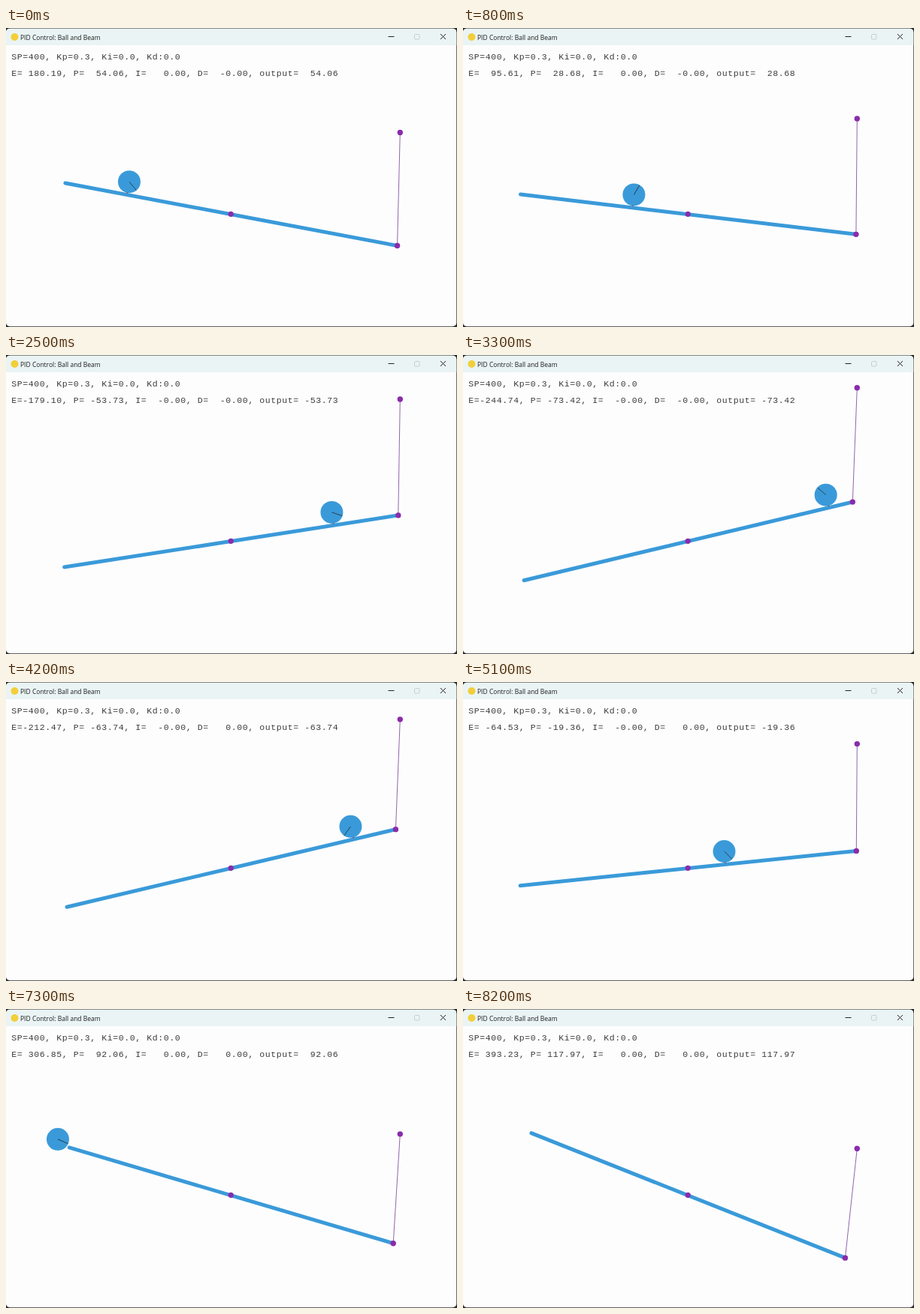
Recreate the animation shown at these times as an HTML page. Size 600 by 399 pixels, loop 8300 ms.

```html
<!DOCTYPE html>
<html lang="en">
<head>
<meta charset="utf-8">
<title>PID Control: Ball and Beam</title>
<style>
  html, body { margin: 0; width: 100%; height: 100%; overflow: hidden; background: #2a2c2e; }
  svg { display: block; width: 600px; height: 399px; }
  .title { font: 8.5px "Open Sans", "Noto Sans", sans-serif; fill: #1c1c1c; }
  .log { font: 11.5px "Liberation Mono", "Courier New", monospace; letter-spacing: 0.6px; fill: #3c3c3c; white-space: pre; }
  .beam { stroke: #3a9ad9; stroke-width: 5; stroke-linecap: round; }
  .link { stroke: #85559f; stroke-width: 0.9; }
  .joint { fill: #8a2bab; }
  .icon { fill: none; stroke: #222; stroke-width: 1; }
</style>
</head>
<body>
<svg viewBox="0 0 600 399">
  <defs>
    <clipPath id="win"><rect x="0" y="0.7" width="599.3" height="397.6" rx="5"/></clipPath>
  </defs>
  <g clip-path="url(#win)">
    <rect width="600" height="399" fill="#fdfdfe"/>
    <rect width="600" height="23" fill="#eaf4f4"/>
    <circle cx="11.5" cy="12" r="5" fill="#f2cf3a"/>
    <text class="title" x="19" y="15.9">PID Control: Ball and Beam</text>
    <path class="icon" d="M508.5 11.5h8M578 8l7 7M585 8l-7 7"/>
    <rect class="icon" x="543.5" y="8.5" width="6.5" height="6.5" rx="1" style="stroke:#c6cfcf"/>
    <text class="log" x="7.3" y="41.7">SP=400, Kp=0.3, Ki=0.0, Kd:0.0</text>
    <text class="log" x="7.3" y="64.2" id="log"></text>
    <line class="beam" id="beam"/>
    <g id="ball">
      <circle r="15" fill="#3a9ad9"/>
      <line id="spoke" x2="14.5" stroke="#2c3e50" stroke-width="0.9"/>
    </g>
    <circle id="touch" r="1" fill="#8a5a68"/>
    <line class="link" id="link"/>
    <circle class="joint" cx="299.2" cy="248.3" r="3.6"/>
    <circle class="joint" id="motor" r="3.7"/>
    <circle class="joint" id="tip" r="3.7"/>
  </g>
</svg>
<script>
const LOOP = 8300, STEP = 100;
const PX = 299, PY = 248.6, ARM = 225.5, CAP = 1.5, MOTOR_X = 524.3;
const R = 15, GAP = 17.5, SPIN0 = 3.79;
const LEAVE = 7.3, GRAVITY = 675;

// time (s), ball position, ball speed
const keys = [
  [0, 219.81, 55], [1.5, 418.46, 172], [2.5, 579.10, 120], [4.2, 612.47, -118],
  [6, 281.04, -197], [7, 120, -86], [7.3, 93.147, -96], [8.2, 6.77, -96]
];

const $ = id => document.getElementById(id);
const set = (id, attrs) => {
  for (const k in attrs) $(id).setAttribute(k, attrs[k]);
};
const num = v => v.toFixed(2).padStart(7);
const zero = neg => (neg ? '-0.00' : '0.00').padStart(7);

// cubic Hermite: position and speed
function track(t) {
  let i = 0;
  while (i < keys.length - 2 && t >= keys[i + 1][0]) i++;
  const [t0, p0, v0] = keys[i], [t1, p1, v1] = keys[i + 1];
  const h = t1 - t0, u = (t - t0) / h, d = p1 - p0;
  const a = 3 * d - h * (2 * v0 + v1), b = h * (v0 + v1) - 2 * d;
  return {
    pos: p0 + u * (h * v0 + u * (a + u * b)),
    vel: v0 + u * (2 * a + 3 * u * b) / h
  };
}

function pose(t) {
  const { pos, vel } = track(t);
  const err = 400 - pos;
  const motorY = 98.5 + 0.225 * err + 0.007 * vel;
  const tipY = motorY + 149.2 + 0.035 * vel + 0.008 * Math.max(0, -err);
  const sin = (tipY - PY) / ARM, cos = Math.sqrt(1 - sin * sin);
  const x = 0.75 * pos - 0.9;
  const endX = PX - ARM * cos, endY = PY - ARM * sin;

  let y, spin;
  if (t > LEAVE) {
    const off = pose(LEAVE), dt = t - LEAVE;
    y = off.y + 80 * dt + GRAVITY * dt * dt / 2;
    spin = off.spin - 7 * dt;
  } else {
    // resting on the beam, or pivoting over its left end
    y = x < endX + GAP * sin
      ? endY - Math.sqrt(Math.max(0, GAP * GAP - (x - endX) ** 2))
      : PY + (x - PX) * sin / cos - GAP / cos;
    const s = (x - PX) * cos + (y - PY) * sin;
    const over = Math.min(GAP, Math.max(0, -ARM - s));
    spin = SPIN0 + Math.max(s, -ARM) / R - Math.asin(over / GAP) + Math.asin(sin);
  }
  return { err, vel, motorY, tipY, sin, cos, x, y, spin, endX, endY };
}

function draw(ms) {
  const t = ms / 1000, p = pose(t);
  const tipX = PX + ARM * p.cos, out = num(0.3 * p.err);
  $('log').textContent = `E=${num(p.err)}, P=${out}, I=${zero(t > 2 && t < 6.7)}, ` +
    `D=${zero(p.vel > 0)}, output=${out}`;
  set('beam', { x1: p.endX + CAP * p.cos, y1: p.endY + CAP * p.sin, x2: tipX, y2: p.tipY });
  set('link', { x1: MOTOR_X, y1: p.motorY, x2: tipX, y2: p.tipY });
  set('motor', { cx: MOTOR_X, cy: p.motorY });
  set('tip', { cx: tipX, cy: p.tipY });
  set('ball', { transform: `translate(${p.x} ${p.y})` });
  set('spoke', { transform: `rotate(${p.spin * 180 / Math.PI})` });
  set('touch', {
    cx: p.x - R * p.sin, cy: p.y + R * p.cos,
    visibility: t < 7 ? 'visible' : 'hidden'
  });
}

const start = performance.now();
function tick() {
  const ms = (performance.now() - start) % LOOP;
  draw(Math.floor(ms / STEP) * STEP);
  requestAnimationFrame(tick);
}
tick();
</script>
</body>
</html>
```
